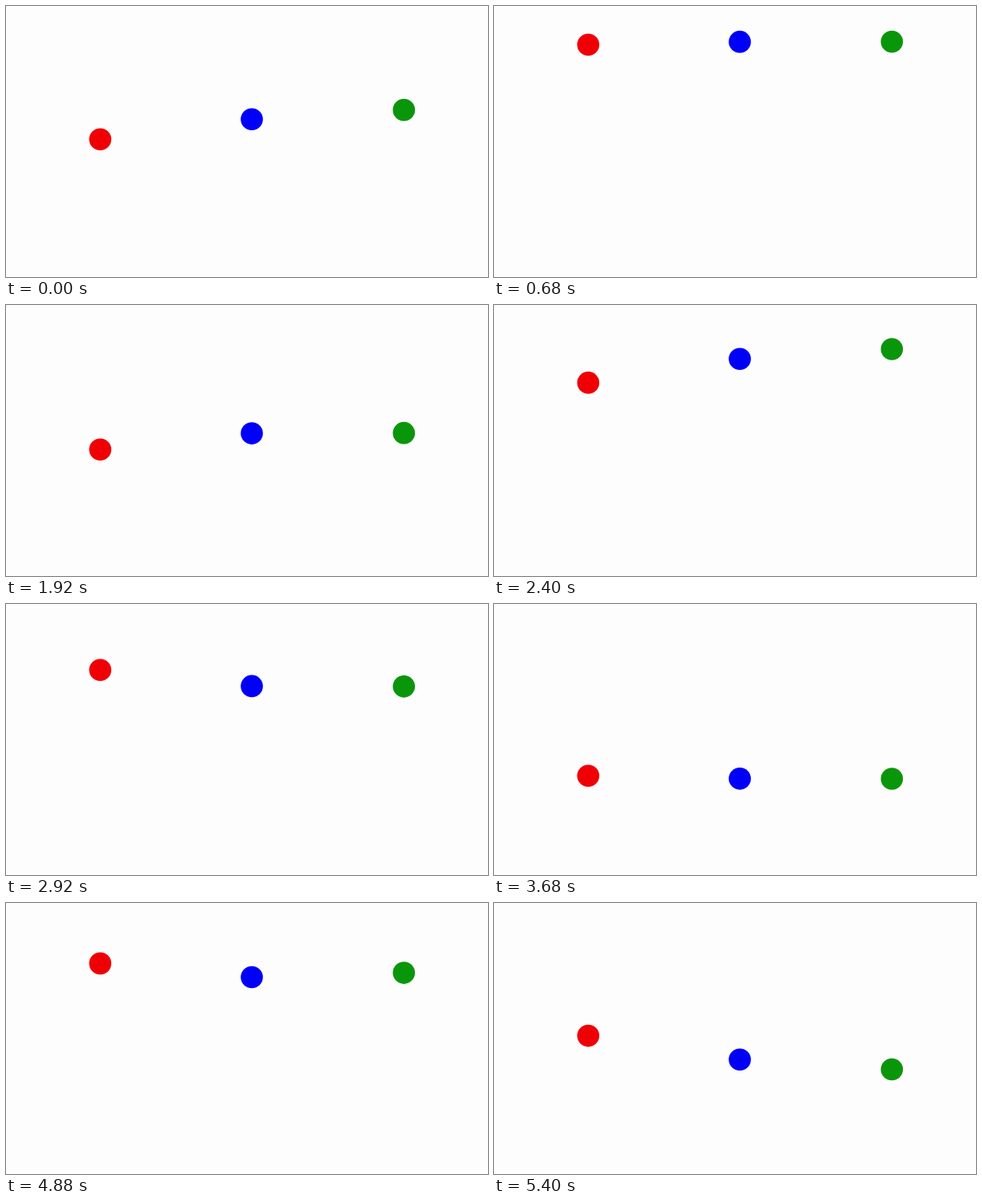
These frames come from a looping animation (600 px wide and 338 px high, 5.44 s). An HTML page:

```html
<!DOCTYPE html>
<html lang="en">
<head>
<meta charset="utf-8">
<title>Easing comparison</title>
<style>
  html, body { margin: 0; width: 100%; height: 100%; overflow: hidden; background: #fefdfe; }
  svg { display: block; width: 100vw; height: 100vh; }
</style>
</head>
<body>
<svg viewBox="0 0 600 338"></svg>
<script>
const LOOP = 5440, STEP = 40, HALF = 1000, LEAD = 298;
const TOP = 44.5, BOTTOM = 218, RADIUS = 13.8;

// CSS-style cubic Bézier timing function, solved by bisection.
function bezier(x1, y1, x2, y2) {
  const at = (a, b, s) => 3 * a * s * (1 - s) ** 2 + 3 * b * s * s * (1 - s) + s ** 3;
  return x => {
    let lo = 0, hi = 1;
    for (let i = 0; i < 30; i++) {
      const mid = (lo + hi) / 2;
      if (at(x1, x2, mid) < x) lo = mid; else hi = mid;
    }
    return at(y1, y2, lo);
  };
}

const svg = document.querySelector("svg");
const balls = [
  { x: 117.3, color: "#f00004", ease: x => x },
  { x: 306, color: "#0000fa", ease: bezier(0, 0, 0.58, 1) },
  { x: 495.3, color: "#0a960a", ease: bezier(0.25, 0.1, 0.25, 1) },
];

for (const ball of balls) {
  ball.node = document.createElementNS("http://www.w3.org/2000/svg", "circle");
  ball.node.setAttribute("cx", ball.x);
  ball.node.setAttribute("r", RADIUS);
  ball.node.setAttribute("fill", ball.color);
  svg.append(ball.node);
}

function draw() {
  const time = Math.floor(performance.now() % LOOP / STEP) * STEP;
  const phase = (time + LEAD) / HALF;
  const rising = Math.floor(phase) % 2 === 0;
  const [from, to] = rising ? [BOTTOM, TOP] : [TOP, BOTTOM];
  for (const { node, ease } of balls) {
    node.setAttribute("cy", from + (to - from) * ease(phase % 1));
  }
  requestAnimationFrame(draw);
}
draw();
</script>
</body>
</html>
```
